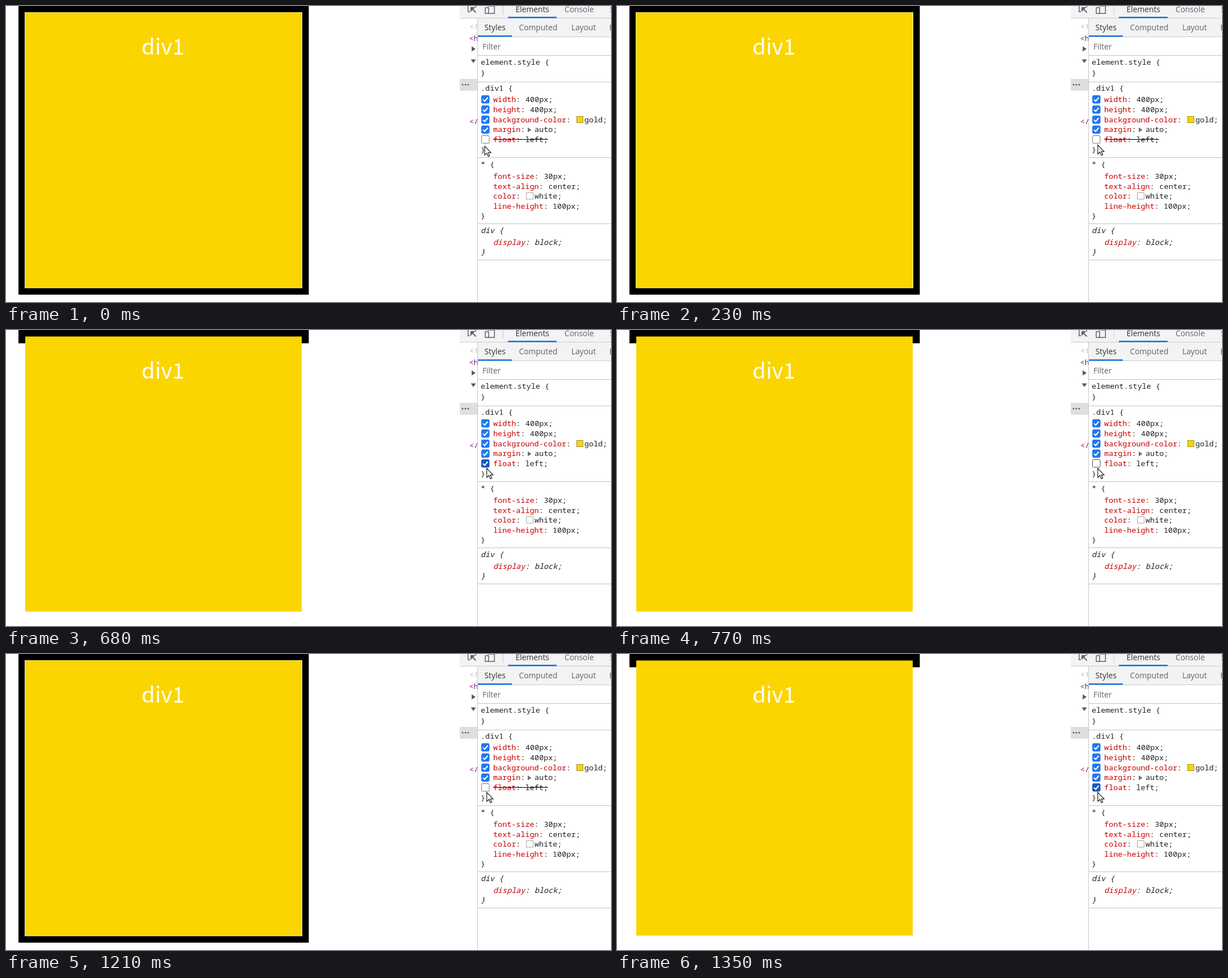
Write an HTML page that moves like this. It is 1068 px wide and 524 px high and loops after 1.45 s.

```html
<!DOCTYPE html>
<html>
<head>
<meta charset="utf-8">
<style>
  html, body { margin: 0; width: 100%; height: 100%; overflow: hidden; background: #fff; }
  svg { display: block; }
  text { white-space: pre; }
  .ui { font: 13.8px "Open Sans", "Noto Sans", sans-serif; fill: #5f6368; }
  .code { font: 13.45px "Noto Sans Mono", "DejaVu Sans Mono", monospace; fill: #222; }
  .title { font: 38.5px "Noto Sans CJK SC", "Noto Sans CJK", "Noto Sans", sans-serif; fill: #fff; }
  .prop { fill: #c80000; }
  .tag { fill: #881280; }
  .off { text-decoration: line-through; }
</style>
</head>
<body>
<svg width="1068" height="524" viewBox="0 0 1068 524">
  <rect id="frame" x="22" width="512.5" />
  <rect id="edge" x="33" y="11" width="490" height="488.5" fill="#fff3b8" />
  <rect x="34" y="11.5" width="488" height="487" fill="#fad500" />
  <text class="title" x="277" y="86" text-anchor="middle">div1</text>

  <!-- toolbar and tabs -->
  <path d="M801 0H1068V21H801ZM833 22H1068V54H833Z" fill="#f3f3f3" />
  <path d="M801 21.5H1068M833 54.5H1068M877.5 0V15" stroke="#ccc" />
  <path d="M886 19H972V21.5H886ZM833 52H893V54.5H833Z" fill="#1a73e8" />
  <g fill="none" stroke="#5f6368" stroke-width="1.5">
    <path d="M815.7 0V10.3H819M829 0V3" />
    <path d="M821 3L829.5 11.5" stroke-width="2" />
    <path d="M850 13.2H862.3V0M850 0H862" />
    <rect x="846" y="3" width="6" height="10.2" />
  </g>
  <path d="M820 2H828.5L820 10.5Z" fill="#5f6368" />
  <g class="ui">
    <text x="899.5" y="11" fill="#333">Elements</text>
    <text x="986" y="11">Console</text>
    <text x="1066" y="11">Sources</text>
    <text x="844.5" y="43" style="fill:#333">Styles</text>
    <text x="905.5" y="43">Computed</text>
    <text x="998" y="43">Layout</text>
    <text x="1065" y="43">Event Listeners</text>
    <text x="841" y="77">Filter</text>
  </g>

  <!-- element tree -->
  <svg x="801" y="22" width="31" height="502" viewBox="801 22 31 502">
    <rect x="801" y="129" width="31" height="21" fill="#dfdfdf" />
    <g fill="#5a5a5a">
      <circle cx="806" cy="139.3" r="1.4" /><circle cx="811" cy="139.3" r="1.4" /><circle cx="816" cy="139.3" r="1.4" />
      <path d="M822 71.5L829 76L822 80.5ZM820.5 94.5H829.5L825 101Z" />
    </g>
    <g class="code">
      <text x="818" y="41" fill="#b4b4b4">&lt;!</text>
      <text class="tag" x="817.5" y="61.5">&lt;h</text>
      <text class="tag" x="818" y="208.5">&lt;/</text>
    </g>
  </svg>

  <path d="M832.5 22V524" stroke="#c8c8c8" />
  <path d="M833 87.5H1068M833 134.5H1068M833 268.5H1068M833 385.5H1068M833 449.5H1068" stroke="#c6c0c6" />
  <g id="rules" class="code"></g>
  <path d="M921 215L927.5 219.2L921 223.4Z" fill="#6e6e6e" />
  <rect x="1007.5" y="195.5" width="11" height="11" fill="#fad500" stroke="#9a8a30" />
  <rect x="918.5" y="330.5" width="12" height="11.5" fill="#fff" stroke="#a6a6a6" />
  <g id="boxes"></g>
  <path id="cursor" d="M0 0V16L3.8 12.6L6.4 18.4L8.8 17.3L6.3 11.7H11.2Z" fill="#fff" stroke="#222" stroke-width="1.2" />
</svg>
<script>
const $ = id => document.getElementById(id);

// [baseline, selector or brace] and [baseline, property, value, value x]
const plain = [[104, 'element.style {'], [123, '}'], [150, '.div1 {'], [258.5, '}'],
  [285, '* {'], [376, '}'], [402, 'div {', 1], [440, '}', 1]];
const props = [[170, 'width', '400px', 917], [188, 'height', '400px', 925],
  [205.5, 'background-color', 'gold', 1021], [223, 'margin', 'auto', 933],
  [241, 'float', 'left', 917], [306, 'font-size', '30px', 949.5],
  [324, 'text-align', 'center', 957.5], [341, 'color', 'white', 933],
  [359, 'line-height', '100px', 965], [423, 'display', 'block', 933, 1]];

const slant = on => on ? ' font-style="italic"' : '';
$('rules').innerHTML =
  plain.map(([y, s, it]) => `<text x="838" y="${y}"${slant(it)}>${s}</text>`).join('') +
  props.map(([y, name, value, x, it]) => name === 'float'
    ? `<text id="float" x="860" y="${y}"><tspan class="prop">float</tspan>: left;</text>`
    : `<text x="860" y="${y}"${slant(it)}><tspan class="prop">${name}</tspan>:<tspan x="${x}">${value};</tspan></text>`
  ).join('');

const box = (y, id) => `<g id="${id}" transform="translate(839 ${y})">
  <rect x=".5" y=".5" width="13.5" height="13.5" rx="2" fill="#1f77f2" stroke="#1f77f2"/>
  <path d="M3 7.5L6 10.5L11.5 4" fill="none" stroke="#fff" stroke-width="2"/></g>`;
$('boxes').innerHTML = [158, 176, 194, 211.5, 229].map((y, i) => box(y, 'box' + i)).join('');
const square = $('box4').querySelector('rect'), tick = $('box4').querySelector('path');

// start, cursor x, cursor y, box ticked, float applied, box hovered
const steps = [
  [0, 845, 248, 0, 0, 0],
  [80, 848.7, 246, 0, 0, 1],
  [230, 848.7, 246, 0, 0, 0],
  [310, 848.7, 246, 1, 1, 1],
  [680, 848.7, 245, 1, 1, 1],
  [770, 848.7, 245, 0, 1, 1],
  [820, 848.7, 245, 0, 0, 1],
  [1210, 848.7, 245, 0, 0, 0],
  [1290, 848.7, 245, 1, 0, 1],
  [1350, 848.7, 245, 1, 1, 1]];

function draw() {
  const t = performance.now() % 1450;
  const [, x, y, ticked, floated, hover] = steps.findLast(s => s[0] <= t);
  $('cursor').setAttribute('transform', `translate(${x} ${y})`);
  $('frame').setAttribute('height', floated ? 23.5 : 511);
  $('edge').setAttribute('visibility', floated ? 'hidden' : 'visible');
  $('float').setAttribute('class', floated ? '' : 'off');
  const line = hover ? '#4f4f4f' : '#767676', blue = hover ? '#1858bd' : '#1f77f2';
  square.setAttribute('fill', ticked ? blue : '#fff');
  square.setAttribute('stroke', ticked ? blue : line);
  tick.setAttribute('visibility', ticked ? 'visible' : 'hidden');
  requestAnimationFrame(draw);
}
draw();
</script>
</body>
</html>
```
